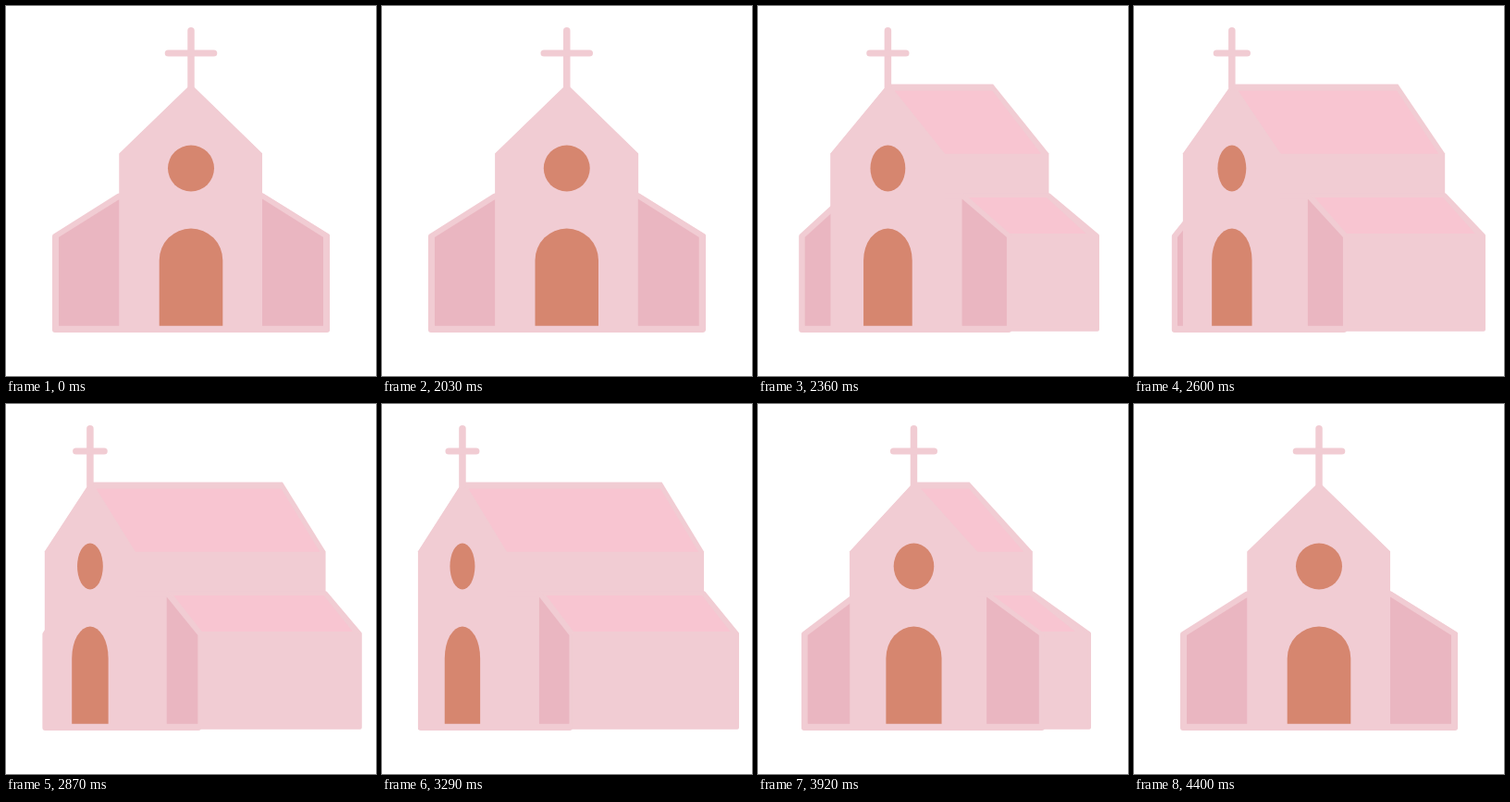
An HTML page that plays this animation: 400 px wide and 400 px high, repeating every 4430 ms.

```html
<!DOCTYPE html>
<html lang="en">
<head>
<meta charset="utf-8">
<title>Turning church</title>
<style>
  html, body { margin: 0; width: 100%; height: 100%; overflow: hidden; background: #fff; }
  svg { display: block; width: 100vw; height: 100vh; }
  .wall { fill: #f1ccd3; stroke: #f1ccd3; stroke-width: 0; stroke-linejoin: round; stroke-linecap: round; }
  .wing { fill: #eab6c1; }
  .roof { fill: #f8c5d1; }
  .wood { fill: #d6866f; }
</style>
</head>
<body>
<svg viewBox="0 0 400 400">
  <path id="nave" class="wall"/>
  <path id="aisle" class="wall" stroke-width="4" style="stroke-width:4"/>
  <path id="base" class="wall" style="stroke-width:6"/>
  <path id="leftWing" class="wing"/>
  <path id="front" class="wall"/>
  <path id="rightWing" class="wing"/>
  <path id="roof" class="roof"/>
  <path id="lowRoof" class="roof"/>
  <path id="post" class="wall" style="stroke-width:7.5"/>
  <path id="bar" class="wall" style="stroke-width:7.2"/>
  <ellipse id="rose" class="wood" cy="175.5" ry="25"/>
  <path id="door" class="wood"/>
</svg>
<script>
const LOOP = 4430, START = 2000, HALF = 1200, STEP = 30, PEAK = 1.006;
const $ = id => document.getElementById(id);
const poly = (...pts) => 'M' + pts.map(q => q[0].toFixed(2) + ' ' + q[1].toFixed(2)).join('L') + 'Z';
const draw = (id, d) => $(id).setAttribute('d', d);

// Ease with control points (x1, 0) and (x2, 1)
function ease(x, x1, x2) {
  if (x <= 0) return 0;
  if (x >= 1) return 1;
  let lo = 0, hi = 1, s = 0.5;
  for (let i = 0; i < 30; i++) {
    s = (lo + hi) / 2;
    const v = 1 - s;
    if (3 * v * v * s * x1 + 3 * v * s * s * x2 + s * s * s < x) lo = s; else hi = s;
  }
  return s * s * (3 - 2 * s);
}

// 0 = seen from the front, about 1 = fully turned
function turnAt(ms) {
  const u = Math.floor((ms - START) / STEP) * STEP;
  if (u <= 0) return 0;
  return PEAK * (u < HALF ? ease(u / HALF, 0.32, 0.12) : 1 - ease((u - HALF) / HALF, 0.61, 0.4));
}

function render(p) {
  const at = (a, b) => a + (b - a) * p;
  const cx = at(200, 87);
  const left = at(122.5, 39), right = at(277, 135);
  const backTop = at(200, 302.5), backEave = at(277, 348);
  const outL = at(50, 39), outR = at(350, 206), far = at(350, 386);
  const wingL = at(277, 170), wingR = at(343, 202.5);

  // Body and side aisle
  draw('nave', poly([cx, 84.5], [backTop, 84.5], [backEave, 159.5], [backEave, 350], [left, 350], [left, 159.5]));
  draw('aisle', poly([wingL, 204.3], [backEave, 204.3], [far - 2, 248.2], [far - 2, 349.7], [wingL, 349.7]));

  // Front base with both wings
  draw('base', poly([outL + 3, 249], [at(122, 70), 205.5], [wingL, 205.5],
    [outR - 3, 249], [outR - 3, 350], [outL + 3, 350]));
  draw('leftWing', poly([at(57, 45), 250], [at(122.5, 72), 209], [at(122.5, 72), 345.7], [at(57, 45), 345.7]));
  draw('front', poly([cx, 84.5], [right, 159.5], [right, 352], [left, 352], [left, 159.5]));
  draw('rightWing', poly([wingL, 208.5], [wingR, 250], [wingR, 345.7], [wingL, 345.7]));

  // Roof panels open up as the building turns
  const panel = (y1, a, b, y2, c, d) =>
    poly([a, y1], [Math.max(a, b), y1], [Math.max(c, d), y2], [c, y2]);
  draw('roof', panel(91.5, at(208, 93.5), at(200, 301), 159.7, at(277, 135), at(266, 342)));
  draw('lowRoof', panel(207, at(284, 177.5), at(274, 346), 246, at(345, 207), at(330, 376.5)));

  // Cross
  const arm = at(28.3, 18.5) - 3.6;
  draw('post', `M${cx} 26.7V88`);
  draw('bar', `M${cx - arm} 51H${cx + arm}`);

  // Window and door
  $('rose').setAttribute('cx', cx);
  $('rose').setAttribute('rx', at(25, 13.5));
  const r = at(34.3, 19.2);
  draw('door', `M${cx - r} 345.7V275A${r} 34.5 0 0 1 ${cx + r} 275V345.7Z`);
}

const origin = performance.now();
function tick() {
  render(turnAt((performance.now() - origin) % LOOP));
  requestAnimationFrame(tick);
}
tick();
</script>
</body>
</html>
```
